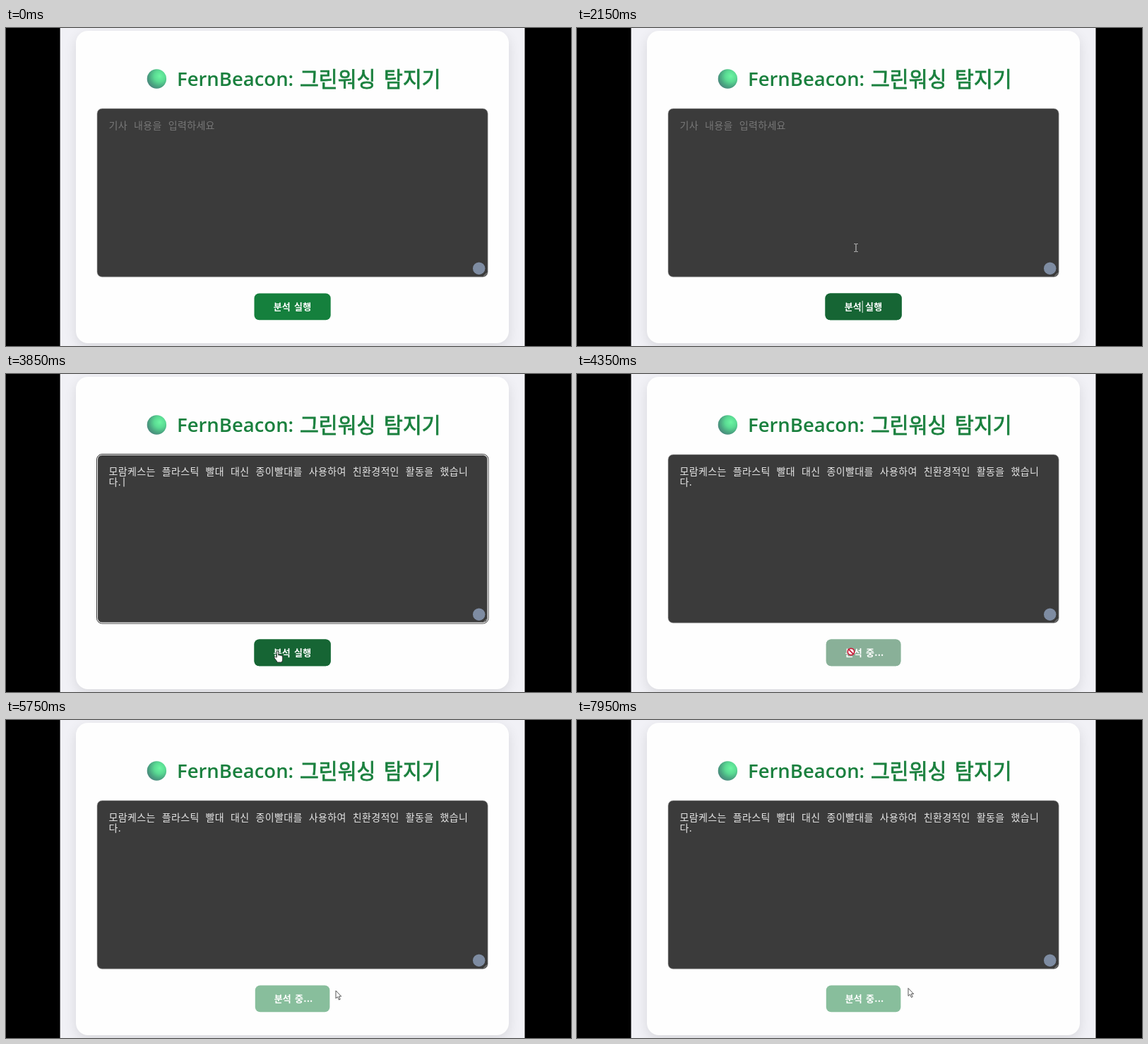
Recreate the animation shown at these times as an HTML page. Size 800 by 450 pixels, loop 8000 ms.

```html
<!DOCTYPE html>
<html lang="ko">
<head>
<meta charset="utf-8">
<style>
  html, body { margin: 0; width: 100%; height: 100%; overflow: hidden; background: #000; }
  svg { display: block; }
  text { font-family: "Noto Sans CJK KR", "Noto Sans CJK", "Noto Sans KR", sans-serif; white-space: pre; }
  .title { fill: #1a803e; stroke: #1a803e; stroke-width: .8px; font-size: 29.2px; word-spacing: 3.5px; }
  .brand { fill: #1a803e; font: 600 27.5px "Open Sans", "Noto Sans", sans-serif; }
  .body { font-size: 14px; letter-spacing: .36px; word-spacing: 4.7px; }
  .body, .body text { font-family: "Noto Sans CJK KR Light", "Noto Sans CJK KR", "Noto Sans CJK", sans-serif; font-weight: 300; }
  .label { fill: #fff; font-weight: 700; font-size: 13px; letter-spacing: .2px; word-spacing: 1.2px; }
</style>
</head>
<body>
<svg width="800" height="450" viewBox="0 0 800 450">
  <defs>
    <radialGradient id="ball" cx=".66" cy=".36" r=".72">
      <stop offset="0" stop-color="#6cf5a2"/>
      <stop offset=".4" stop-color="#5adb93"/>
      <stop offset=".75" stop-color="#4aa681"/>
      <stop offset="1" stop-color="#4a857c"/>
    </radialGradient>
    <filter id="soft" x="-10%" y="-10%" width="120%" height="120%"><feGaussianBlur stdDeviation="9"/></filter>
    <clipPath id="page"><rect x="76.6" width="657.9" height="450"/></clipPath>
  </defs>

  <rect width="800" height="450"/>
  <g clip-path="url(#page)">
    <rect x="76" width="660" height="450" fill="#f1f1f6"/>
    <rect x="99" y="10" width="613" height="442" rx="17" fill="#000" opacity=".1" filter="url(#soft)"/>
    <rect x="99" y="4" width="613" height="442" rx="17" fill="#fefefe"/>
  </g>

  <circle cx="213.4" cy="72" r="13.7" fill="url(#ball)"/>
  <text class="brand" x="242" y="82">FernBeacon:</text>
  <text class="title" x="416" y="83">그린워싱 탐지기</text>

  <rect x="129" y="114" width="553.2" height="238.2" rx="7" fill="#3b3b3b" stroke="#a8a8a8" stroke-width=".6"/>
  <g id="ring" fill="none">
    <rect x="128.5" y="113.5" width="554.5" height="239.5" rx="7.5" stroke="#2c2c2c"/>
    <rect x="129.5" y="114.5" width="552.5" height="237.5" rx="6.5" stroke="#fff"/>
  </g>
  <path d="M676.5 351l4.5-4.5M679.3 351l1.7-1.7" stroke="#bbb" stroke-width=".8"/>
  <circle cx="669.7" cy="340.2" r="8.7" fill="#7e8ca2"/>

  <text id="hint" class="body" x="145.5" y="143" fill="#787878">기사 내용을 입력하세요</text>
  <g id="entry" class="body" fill="#e6e6e6">
    <text x="145.5" y="143">모람케스는 플라스틱 빨대 대신 종이빨대를 사용하여 친환경적인 활동을 했습니</text>
    <text x="145.5" y="158">다.</text>
  </g>
  <rect id="caret" width="1" height="13" fill="#fff"/>

  <g id="fills">
    <rect class="face" y="375.4" height="37.9" rx="7" fill="#15803d"/>
    <rect id="dark" class="face" y="375.4" height="37.9" rx="7" fill="#166534"/>
  </g>
  <text id="label" class="label" y="399.3"></text>
  <rect id="mark" x="403.7" y="386" width="1" height="17" fill="#e8f0ea"/>

  <g id="pointer">
    <path id="beam" d="M-2.5-5.5h2M.5-5.5h2M-2.5 5.5h2M.5 5.5h2M0-5v10" fill="none" stroke="#d0d0d0"/>
    <path id="arrow" d="M0 0v11l2.5-2.3 1.9 4.3 1.8-.8-1.9-4.1h3.4z" fill="#fff" stroke="#444" stroke-width=".9" stroke-linejoin="round"/>
    <path id="hand" d="M-1.2 9V1.2a1.2 1.2 0 0 1 2.4 0V6q1.5-1 2.3.3 1.5-.7 2.1.5 1.6-.5 1.6 1.2v3.4q0 2.4-1.4 4.6H-.4q-.6-2-2.3-3.7l-1.9-2.6q-.3-1.7 1.4-1.4z" fill="#fff" stroke="#222" stroke-width=".9" stroke-linejoin="round"/>
    <g id="stop" fill="#fff" stroke="#c8203c" stroke-width="1.8">
      <circle r="4.7"/><path d="M-3.3-3.3L3.3 3.3"/>
    </g>
  </g>
</svg>
<script>
const LOOP = 8000, STEP = 50;
const ENTER = 1150, FOCUS = 2450, PASTE = 2700, BLUR = 4000, BUSY = 4050, BLINK = 530;
const $ = id => document.getElementById(id);
const show = (id, on) => $(id).style.display = on ? "" : "none";
const clamp = v => Math.max(0, Math.min(1, v));
const within = (t, a, b) => t >= a && t < b;

// Pointer stops: time, x, y
const path = [
  [ENTER, 546, 393], [1700, 420, 393], [1850, 420, 393], [2050, 404, 390],
  [2150, 395, 311], [2600, 386, 205], [3250, 386, 205], [3800, 384.5, 392],
  [BUSY - STEP, 384.5, 392], [BUSY, 388, 393], [5050, 388, 393],
  [5700, 467, 383], [6300, 467, 383], [7000, 469, 379.5], [LOOP, 469, 379.5]
];
const hovers = [[1500, 2200], [3600, 5450]];

function pointerAt(t) {
  const i = path.findIndex(p => p[0] > t);
  const [t0, x0, y0] = path[i - 1], [t1, x1, y1] = path[i];
  const k = (t - t0) / (t1 - t0), e = k * k * (3 - 2 * k);
  return [x0 + (x1 - x0) * e, y0 + (y1 - y0) * e];
}

function shapeAt(x, y, busy) {
  if (x > 352 && x < 460 && y > 376 && y < 413) return busy ? "stop" : "hand";
  return x > 129 && x < 682 && y > 114 && y < 352 ? "beam" : "arrow";
}

function draw(t) {
  const busy = t >= BUSY, pasted = t >= PASTE, focused = within(t, FOCUS, BLUR);
  show("ring", focused);
  show("hint", !pasted);
  show("entry", pasted);

  const since = t - (pasted ? PASTE : FOCUS);
  show("caret", focused && Math.floor(since / BLINK) % 2 === 0);
  $("caret").setAttribute("x", pasted ? 166.5 : 146);
  $("caret").setAttribute("y", pasted ? 146.5 : 131.5);

  const tint = hovers.reduce((s, [a, b]) => s + clamp((t - a) / 200) - clamp((t - b) / 200), 0);
  $("dark").setAttribute("opacity", tint);
  $("fills").setAttribute("opacity", busy ? .5 : 1);
  document.querySelectorAll(".face").forEach(r => {
    r.setAttribute("x", busy ? 352.8 : 351.5);
    r.setAttribute("width", busy ? 105.6 : 108.2);
  });
  $("label").textContent = busy ? "분석 중..." : "분석 실행";
  $("label").setAttribute("x", busy ? 379.7 : 378.7);
  show("mark", within(t, 1850, 2200));

  const seen = t >= ENTER;
  show("pointer", seen);
  if (!seen) return;
  const [x, y] = pointerAt(t), shape = shapeAt(x, y, busy);
  $("pointer").setAttribute("transform", `translate(${x} ${y})`);
  for (const id of ["beam", "arrow", "hand", "stop"]) show(id, id === shape);
}

const start = performance.now();
function tick() {
  const t = (performance.now() - start) % LOOP;
  draw(Math.floor(t / STEP) * STEP);
  requestAnimationFrame(tick);
}
tick();
</script>
</body>
</html>
```
